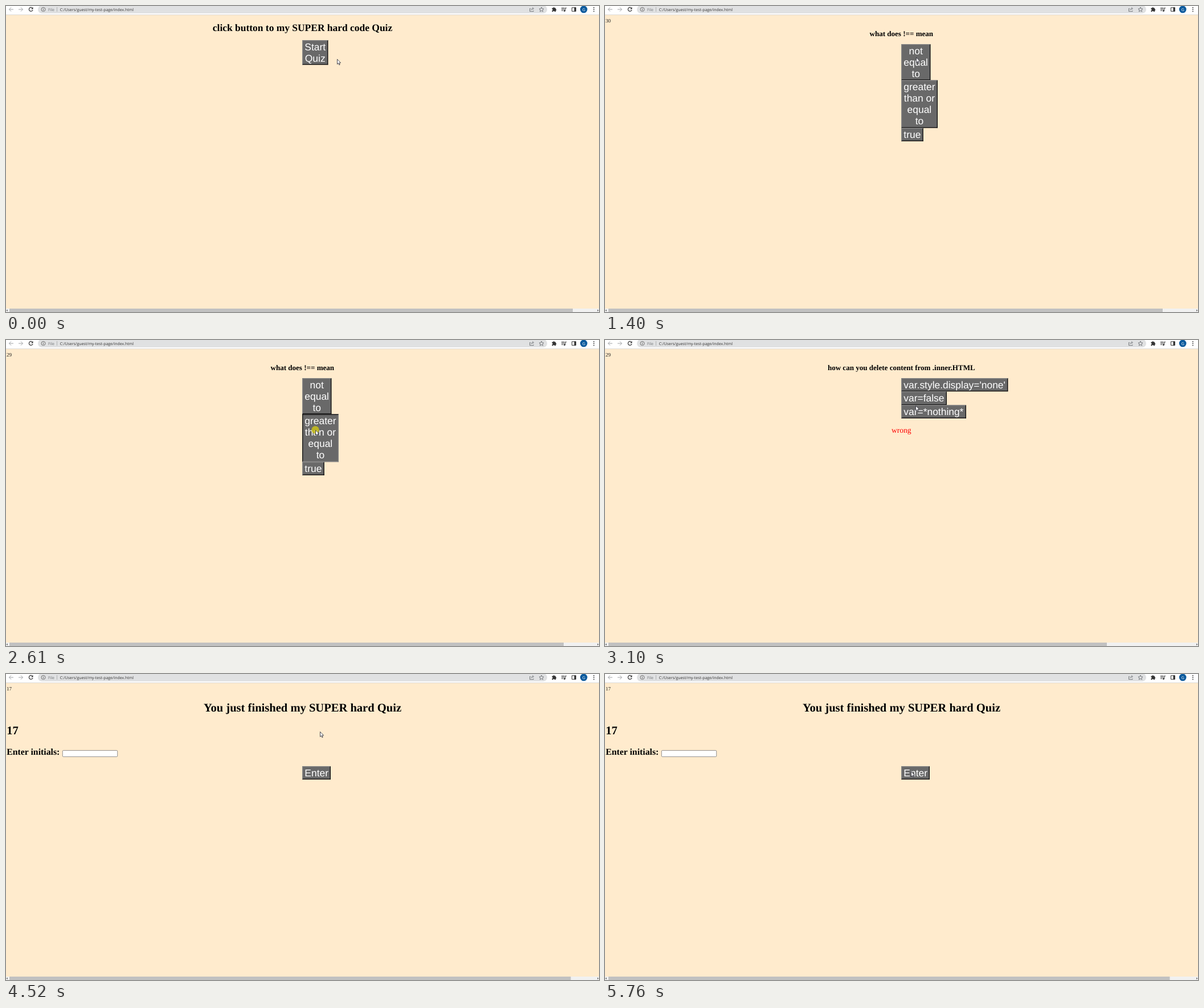
An HTML page that plays this animation: 1041x538 px, repeating every 5830 ms.

```html
<!DOCTYPE html>
<html lang="en">
<head>
<meta charset="utf-8">
<title>Quiz</title>
<style>
  html, body { margin: 0; width: 100%; height: 100%; overflow: hidden; }
  #stage { position: relative; width: 1041px; height: 538px; overflow: hidden; background: #ffebcd; }
  svg, .scene { position: absolute; left: 0; top: 0; overflow: visible; }

  text { font-family: "Liberation Serif", "Times New Roman", serif; text-rendering: geometricPrecision; }
  .mid { text-anchor: middle; }
  .bold { font-weight: bold; }
  .ask { font-size: 13.05px; }
  .ui { font: 6.95px "Open Sans", "Noto Sans", sans-serif; }

  /* Buttons are laid out at full size and shown at two thirds. */
  .keys { position: absolute; left: 520.2px; top: 67px; transform: scale(.6667); transform-origin: 0 0; }
  .keys p {
    margin: 0; width: max-content; padding: .65px 4.5px; border: 2px solid;
    border-color: #858585 #111 #111 #858585; background: #696969; color: #fff;
    font: 26.13px/30px "Liberation Sans", Arial, sans-serif; text-align: center;
    text-rendering: geometricPrecision;
  }
  .thumb { fill: #c1c1c1; }

  /* Every animation shares one loop and changes in hard steps. */
  .scene, .num, .wrong, .hit, #halo, #cursor { animation: 5830ms step-end infinite; }
  .scene, .num, .wrong, #halo { opacity: 0; }

  #intro { animation-name: intro; }
  #q1 { animation-name: q1; }
  #q2 { animation-name: q2; }
  #q3 { animation-name: q3; }
  #done { animation-name: done; }
  .wrong { animation-name: wrong; }
  .n30 { animation-name: n30; }
  .n29 { animation-name: n29; }
  .n23 { animation-name: n23; }
  .n17 { animation-name: done; }
  .keys .hit { animation-name: press; }
  #halo { animation-name: halo; }
  #cursor { animation-name: move; }

  @keyframes intro { 0% { opacity: 1 } 21.61%, 100% { opacity: 0 } }
  @keyframes q1 { 0% { opacity: 0 } 21.61% { opacity: 1 } 45.96%, 100% { opacity: 0 } }
  @keyframes q2 { 0% { opacity: 0 } 45.96% { opacity: 1 } 64.66%, 100% { opacity: 0 } }
  @keyframes q3 { 0% { opacity: 0 } 64.66% { opacity: 1 } 75.3%, 100% { opacity: 0 } }
  @keyframes done { 0% { opacity: 0 } 75.3%, 100% { opacity: 1 } }
  @keyframes wrong { 0% { opacity: 0 } 45.96% { opacity: 1 } 75.3%, 100% { opacity: 0 } }
  @keyframes n30 { 0% { opacity: 0 } 21.61% { opacity: 1 } 41.1%, 100% { opacity: 0 } }
  @keyframes n29 { 0% { opacity: 0 } 41.1% { opacity: 1 } 57.8%, 100% { opacity: 0 } }
  @keyframes n23 { 0% { opacity: 0 } 57.8% { opacity: 1 } 75.3%, 100% { opacity: 0 } }

  @keyframes press {
    0%, 20.4%, 45.96%, 64.66%, 74.1%, 100% { border-color: #858585 #111 #111 #858585 }
    18.18%, 43.4%, 62.44%, 71.9% { border-color: #111 #858585 #858585 #111 }
  }
  @keyframes halo {
    0%, 20.4%, 45.96%, 64.66%, 74.1%, 100% { opacity: 0 }
    18.18%, 43.4%, 62.44%, 71.9% { opacity: .78 }
  }
  @keyframes move {
    0% { transform: translate(581px, 93px) }
    1.2% { transform: translate(581px, 93px); animation-timing-function: steps(5, start) }
    6.78% { transform: translate(560px, 91px) }
    12.52% { transform: translate(560px, 91px); animation-timing-function: steps(2, start) }
    16.98% { transform: translate(557px, 91px) }
    21.78% { transform: translate(557px, 91px); animation-timing-function: steps(2, start) }
    24% { transform: translate(546px, 90px) }
    26.24% { transform: translate(546px, 90px); animation-timing-function: steps(2, start) }
    28.47% { transform: translate(545px, 100px); animation-timing-function: steps(4, start) }
    33% { transform: translate(534px, 130px); animation-timing-function: steps(5, start) }
    38.85% { transform: translate(537px, 151px) }
    39.97% { transform: translate(537px, 151px); animation-timing-function: steps(3, start) }
    43.3% { transform: translate(543px, 158px) }
    47% { transform: translate(543px, 158px); animation-timing-function: steps(3, start) }
    50.94% { transform: translate(543px, 155px); animation-timing-function: steps(2, start) }
    53.1% { transform: translate(545px, 115px) }
    54.03% { transform: translate(545px, 115px); animation-timing-function: steps(6, start) }
    61.15% { transform: translate(551px, 105px) }
    68.1% { transform: translate(551px, 105px); animation-timing-function: steps(3, start) }
    71.5% { transform: translate(551px, 101px) }
    80.96% { transform: translate(551px, 101px); animation-timing-function: steps(3, start) }
    84.4% { transform: translate(549px, 96px); animation-timing-function: steps(6, start) }
    91.5% { transform: translate(533px, 153px) }
    91.6% { transform: translate(533px, 153px); animation-timing-function: steps(7, start) }
    99.9%, 100% { transform: translate(537px, 171px) }
  }
</style>
</head>
<body>
<div id="stage">

  <!-- Browser bar and scrollbar track -->
  <svg width="1041" height="538" fill="none" stroke-width="1">
    <path fill="#fff" d="M0 0H1041V15H0z"/>
    <path fill="#dcd9d4" d="M0 15H1041V16H0z"/>
    <rect x="56" y="-1" width="894" height="14" rx="7" fill="#e0e1e2"/>
    <g stroke="#a0a3a6">
      <path d="M13 6H5.500M9 2.500 5.500 6 9 9.500"/>
      <path d="M22 6h7.500M26 2.500 29.500 6 26 9.500"/>
    </g>
    <path stroke="#333" stroke-width="1.2" d="M46.500 3.700A3.400 3.400 0 1 0 47 7"/>
    <path fill="#333" d="M47.500 2V5.500H44z"/>
    <circle cx="65.500" cy="6" r="3.500" stroke="#555" stroke-width=".8"/>
    <path stroke="#555" stroke-width=".9" d="M65.500 5.500V8M65.500 3.700V4.600"/>
    <text class="ui" x="74" y="8.700" fill="#73777b">File</text>
    <path stroke="#a5a7a9" stroke-width=".8" d="M89.500 2V10"/>
    <text class="ui" x="94.700" y="8.700" fill="#333">C:/Users/guest/my-test-page/index.html</text>
    <g stroke="#5f6368" stroke-width=".8">
      <path d="M921 4.500H919.500V9.500H926V8M921.500 7.500Q922 4.500 925 4.500M924 2.500 926.500 4.500 924 6.500"/>
      <path d="M940 2 941.200 4.800 944 5 941.900 7 942.600 9.800 940 8.300 937.400 9.800 938.100 7 936 5 938.800 4.800z"/>
    </g>
    <g fill="#333">
      <path d="M958.500 3.500H960.500A1.200 1.200 0 0 1 963 3.500H965V5.500A1.200 1.200 0 0 1 965 8V10H963A1.200 1.200 0 0 0 960.500 10H958.500V8A1.200 1.200 0 0 0 958.500 5.500z"/>
      <circle cx="980.500" cy="8.500" r="1.400"/>
      <circle cx="1032" cy="3" r=".9"/>
      <circle cx="1032" cy="6.200" r=".9"/>
      <circle cx="1032" cy="9.400" r=".9"/>
      <path d="M997.500 2.500H1000.500V9.500H997.500z"/>
    </g>
    <path stroke="#333" d="M975 3.500H980.500M975 5.700H980.500M975 8H978.500M981.700 8.500V3.500H984M993.500 2.800H1000.300V9.300H993.500z"/>
    <circle cx="1014.200" cy="6" r="6.300" fill="#0b5a9d"/>
    <text class="ui mid" x="1014.200" y="8.500" fill="#fff">G</text>
    <path fill="#f1f1f1" d="M0 532H1041V538H0z"/>
    <path fill="#555" d="M2.700 533.500V537L.7 535.200zM1038.300 533.500V537L1040.300 535.200z"/>
  </svg>

  <div class="scene" id="intro">
    <svg width="1041" height="538">
      <text class="mid bold" x="520.500" y="43.800" font-size="17.450">click button to my SUPER hard code Quiz</text>
      <rect class="thumb" x="6" y="532" width="989" height="6"/>
    </svg>
    <div class="keys" style="top:60px"><p class="hit">Start<br>Quiz</p></div>
  </div>

  <div class="scene" id="q1">
    <svg width="1041" height="538">
      <text class="mid bold ask" x="520.300" y="52.800">what does !== mean</text>
      <rect class="thumb" x="6" y="532" width="973" height="6"/>
    </svg>
    <div class="keys">
      <p>not<br>equal<br>to</p>
      <p class="hit">greater<br>than or<br>equal<br>to</p>
      <p>true</p>
    </div>
  </div>

  <div class="scene" id="q2">
    <svg width="1041" height="538">
      <text class="mid bold ask" x="520.300" y="52.800">how can you delete content from .inner.HTML</text>
      <rect class="thumb" x="6" y="532" width="875" height="6"/>
    </svg>
    <div class="keys">
      <p>var.style.display='none'</p>
      <p class="hit">var=false</p>
      <p>var=*nothing*</p>
    </div>
  </div>

  <div class="scene" id="q3">
    <svg width="1041" height="538">
      <text class="mid bold ask" x="520.300" y="52.800">how can you call this specific element &lt;h1 id=headerOne&gt;</text>
      <rect class="thumb" x="6" y="532" width="808.500" height="6"/>
    </svg>
    <div class="keys">
      <p>querySelectAll</p>
      <p class="hit">document.getElementById</p>
      <p>document.getElementByClassName</p>
    </div>
  </div>

  <div class="scene" id="done">
    <svg width="1041" height="538">
      <g class="bold">
        <text class="mid" x="520.500" y="66" font-size="20.550">You just finished my SUPER hard Quiz</text>
        <text x="1.200" y="106.300" font-size="20.550">17</text>
        <text x="1.200" y="142.200" font-size="15.800">Enter initials:</text>
      </g>
      <rect x="99.300" y="134.400" width="96.400" height="11" rx="1.500" fill="#fff" stroke="#767676" stroke-width=".8"/>
      <rect class="thumb" x="6" y="532" width="985.500" height="6"/>
    </svg>
    <div class="keys" style="top:162.400px"><p>Enter</p></div>
  </div>

  <svg width="1041" height="538">
    <g font-size="9.200" fill="#222">
      <text class="num n30" x="1" y="28.500">30</text>
      <text class="num n29" x="1" y="28.500">29</text>
      <text class="num n23" x="1" y="28.500">23</text>
      <text class="num n17" x="1" y="28.500">17</text>
    </g>
    <text class="wrong mid" x="520.300" y="163" font-size="13.550" fill="#f00">wrong</text>
  </svg>

  <svg id="cursor" width="8" height="12">
    <circle id="halo" r="6.700" fill="#d3c913"/>
    <path d="M.5 .6V9.300L2.500 7.500 3.900 10.700 5.200 10.100 3.900 7H6.600z" fill="#fff" stroke="#23232f" stroke-width=".8"/>
  </svg>
</div>
</body>
</html>
```
